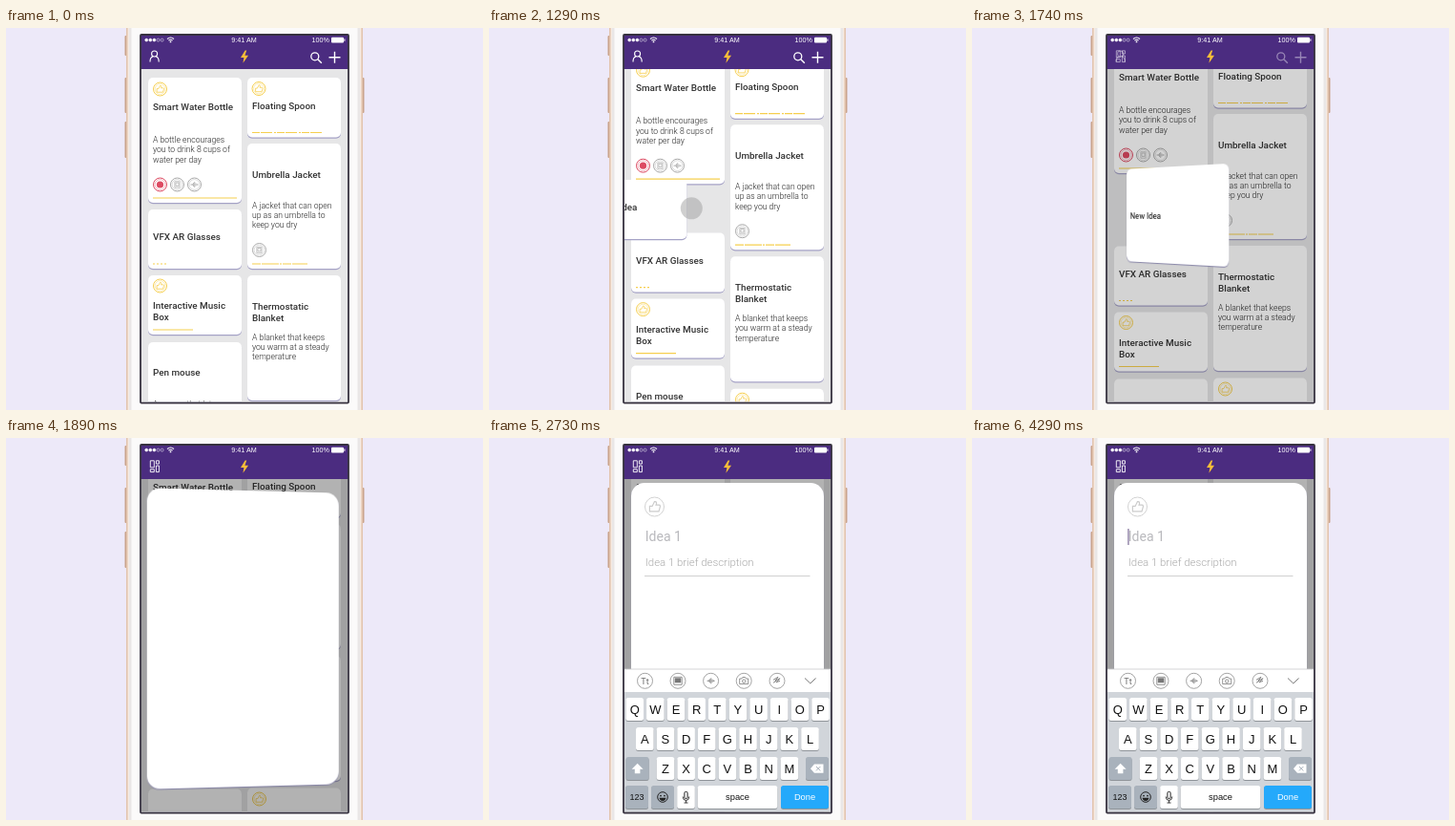
Recreate the animation shown at these times as an HTML page. Size 500 px wide and 400 px high, loop 4.5 s.

```html
<!DOCTYPE html>
<html lang="en">
<head>
<meta charset="utf-8">
<style>
  html, body { margin: 0; width: 100%; height: 100%; overflow: hidden; background: #ede9f9; }
  svg { position: absolute; left: 0; top: 0; width: 500px; height: 400px; }
  text { font-family: Roboto, sans-serif; }
  .key { font-family: "Liberation Sans", sans-serif; }
  #flip { position: absolute; background: #fff; box-shadow: 0 1px 1px #8885a8; }
  #label { position: absolute; inset: 0; display: flex; align-items: center; padding-left: 5px;
    transform: scaleX(-1); font: 500 9.9px Roboto, sans-serif; color: #333; white-space: nowrap; }
</style>
</head>
<body>
<svg id="back" viewBox="0 0 500 400"></svg>
<div id="flip"><div id="label">New Idea</div></div>
<svg id="front" viewBox="0 0 500 400"></svg>
<script>
const $ = id => document.getElementById(id);
const YELLOW = '#f6cf4f', GRAY = '#aaa';

// Drawing helpers returning SVG markup
const rect = (x, y, w, h, fill, r = 0, extra = '') =>
  `<rect x="${x}" y="${y}" width="${w}" height="${h}" rx="${r}" fill="${fill}" ${extra}/>`;
const circle = (x, y, r, fill, stroke = 'none', width = 1) =>
  `<circle cx="${x}" cy="${y}" r="${r}" fill="${fill}" stroke="${stroke}" stroke-width="${width}"/>`;
const line = (d, stroke, width = 1, extra = '') =>
  `<path d="${d}" fill="none" stroke="${stroke}" stroke-width="${width}" ${extra}/>`;
const text = (x, y, str, size, weight, fill, extra = '') =>
  `<text x="${x}" y="${y}" font-size="${size}" font-weight="${weight}" fill="${fill}" ${extra}>${str}</text>`;
const group = (id, body, extra = '') => `<g id="${id}" ${extra}>${body}</g>`;
const at = (x, y, body, scale = 1) => `<g transform="translate(${x} ${y}) scale(${scale})">${body}</g>`;
const middle = 'text-anchor="middle"';

const glyphs = {
  thumb: c => line('M-3.4-.4h1.8L0-3.6c1.5-.3 1.7 1 1 2.4h2.2c.9 0 .9 1 .5 2L3 3.2h-6.4z', c, .8),
  page: c => line('M-2.6-3.2h5.2v6.4h-5.2zM-1.5-2h3v3.4h-3z', c, .7),
  wave: c => line('M-4 0h1.5M-2.2-1v2M-1-2v4M.2-3v6M1.4-1.6v3.2M2.6-.8v1.6M2.6 0H4', c, .8),
  dot: c => circle(0, 0, 3.6, c)
};
const badge = (x, y, kind, color) => at(x, y,
  circle(0, 0, 7, 'none', color) + circle(0, 0, 5.4, 'none', color, .4) + glyphs[kind](color));

function card(x, y, h, { title = [], titleY, desc = [], descY, icons = [], bar, dash = '' }) {
  return rect(x, y + 1.2, 98, h, '#a5a2c6', 5) + rect(x, y, 98, h, '#fff', 5)
    + title.map((s, i) => text(x + 5, titleY + 12 * i, s, 9.9, 500, '#333')).join('')
    + desc.map((s, i) => text(x + 5, descY + 10.2 * i, s, 8.6, 300, '#222')).join('')
    + icons.map(a => badge(...a)).join('')
    + (bar ? line(`M${x + 5} ${y + h - 5}h${bar}`, YELLOW, 1.2, `stroke-dasharray="${dash}"`) : '');
}

const upperLeft = card(149, 52, 131, {
  title: ['Smart Water Bottle'], titleY: 86.3,
  desc: ['A bottle encourages', 'you to drink 8 cups of', 'water per day'], descY: 120.2,
  icons: [[161.5, 64, 'thumb', YELLOW], [161.5, 164, 'dot', '#dd4a62'],
    [179.5, 164, 'page', GRAY], [197.5, 164, 'wave', GRAY]], bar: 88
});
const lowerLeft = card(149, 190, 62, { title: ['VFX AR Glasses'], titleY: 222, bar: 15, dash: '2 2' })
  + card(149, 259, 62, {
    title: ['Interactive Music', 'Box'], titleY: 294,
    icons: [[161.5, 270, 'thumb', YELLOW]], bar: 42
  })
  + card(149, 329, 131, { title: ['Pen mouse'], titleY: 364, desc: ['A mouse that lets'], descY: 397 });
const right = card(253, 52, 62.5, {
    title: ['Floating Spoon'], titleY: 85,
    icons: [[265, 63.5, 'thumb', YELLOW]], bar: 74, dash: '8 1 12 2 2 1'
  })
  + card(253, 121, 131, {
    title: ['Umbrella Jacket'], titleY: 156.5,
    desc: ['A jacket that can open', 'up as an umbrella to', 'keep you dry'], descY: 189,
    icons: [[265.5, 232.5, 'page', GRAY]], bar: 58, dash: '9 1 18 1 2 1'
  })
  + card(253, 259, 131, {
    title: ['Thermostatic', 'Blanket'], titleY: 294.5,
    desc: ['A blanket that keeps', 'you warm at a steady', 'temperature'], descY: 327
  })
  + card(253, 397.5, 62, { icons: [[265.5, 409, 'thumb', YELLOW]] });

const sideButton = (x, y, h) => rect(x, y, 3, h, '#c9a48c', 1);
const phone = sideButton(124.5, 8, 21) + sideButton(124.5, 52, 37) + sideButton(124.5, 98, 38)
  + sideButton(372.5, 52, 37)
  + rect(126, -5, 248, 410, '#e3c4ae') + rect(127.6, -5, 244.8, 410, '#f6ebe3')
  + rect(129, -5, 242, 410, '#e9e6e6') + rect(131.5, -5, 237, 410, '#fbfafa');

$('back').innerHTML = `<clipPath id="screen"><rect x="142" y="8" width="216" height="383.5"/></clipPath>`
  + phone + `<g clip-path="url(#screen)">`
  + rect(142, 8, 216, 384, '#e6e6e7')
  + group('list', upperLeft + group('lower', lowerLeft) + right)
  + group('idea', card(149, 159, 62, { title: ['New Idea'], titleY: 191.3 }))
  + group('touch', circle(0, 188.8, 11.5, 'rgba(160,160,160,.5)'))
  + rect(142, 8, 216, 384, '#000', 0, 'id="dim"') + '</g>';

// Header
const statusBar = [0, 1, 2, 3, 4].map(i =>
    circle(147.2 + 4.1 * i, 12.6, 1.5, i < 3 ? '#fff' : 'none', '#fff', .5)).join('')
  + line('M169 11.5q3.5-3 7 0M170.4 13.1q2.1-1.8 4.2 0', '#fff', 1.1) + circle(172.5, 14.4, .9, '#fff')
  + text(249.5, 15.2, '9:41 AM', 7.2, 500, '#fff', middle + ' class="key"')
  + text(320.5, 15.2, '100%', 7.2, 500, '#fff', 'class="key"')
  + rect(341, 9.8, 13, 5.6, '#fff', 1) + rect(354.4, 11.4, 1, 2.4, '#fff');
const listNav = circle(155.6, 27, 3, 'none', '#fff', 1.1)
  + line('M151 35.5q0-5 3-5.6M160.2 35.5q0-5-3-5.6', '#fff', 1.1)
  + circle(323.8, 29.8, 4, 'none', '#fff', 1.3) + line('M326.8 32.8l4 4M338.5 30.8h12M344.5 24.8v12', '#fff', 1.4);
const gridNav = line('M151.3 23.8h4v7h-4zM157.4 23.8h3v3.2h-3zM157.4 29h3v6.6h-3zM151.3 32.8h4v2.8h-4z', '#fff', .9);
const header = rect(141, 7, 218, 36, '#4b2c80') + statusBar
  + group('listNav', listNav) + group('gridNav', gridNav)
  + '<path d="M250.6 23.5l-4.6 7.6h3.4l-1 5.7 5.6-8h-3.6l1.8-5.3z" fill="#f8bd38"/>';

const form = circle(173.5, 72, 10, 'none', '#d2d2d2') + at(173.5, 72, glyphs.thumb('#ccc'), 1.5)
  + text(163.8, 108.3, 'Idea 1', 14, 400, '#b9b9bd')
  + text(163.8, 134, 'Idea 1 brief description', 11.4, 300, '#aaa')
  + line('M163 144.5h173.5', '#d0d0d0')
  + rect(163, 95, 1.8, 17, '#a79cb8', 0, 'id="caret"');

// Keyboard
const key = (cx, y, w, label = '', fill = '#fff', size = 13, color = '#111') =>
  rect(cx - w / 2, y + 1, w, 24, '#8f9499', 2.5) + rect(cx - w / 2, y, w, 24, fill, 2.5)
  + text(cx, y + 12 + size * .36, label, size, 400, color, middle + ' class="key"');
const keyRow = (letters, x, y) => [...letters].map((c, i) => key(x + 21.65 * i, y, 18.6, c)).join('');
const DARK = '#a9b2bc';
const tool = (x, body) => circle(x, 254.3, 8, 'none', '#999', .9) + at(x, 254.3, body);
const toolbar = rect(142, 242, 216, 24, '#fff') + line('M142 242h216', '#c9c9cc', .8)
  + tool(163.5, text(0, 3.2, 'Tt', 9, 400, '#666', middle))
  + tool(198, rect(-3.2, -3, 6.4, 5, '#777') + line('M-4.2-4h8.4v8h-8.4z', '#777', .8))
  + tool(232.6, glyphs.wave('#777'))
  + tool(267.2, line('M-4.5-2.3h2.2l1-1.5h2.6l1 1.5h2.2v5.6h-9z', '#777', .8) + circle(0, .3, 1.7, 'none', '#777', .8))
  + tool(302, line('M-4-1l5-3-3 4 5-2.5-4 4 4-1.5M-4 2l3-2', '#777', .9))
  + line('M331 251.5l5.8 5.5 5.8-5.5', '#777', 1);
const keyboard = toolbar + rect(142, 266, 216, 126, '#d1d5da')
  + keyRow('QWERTYUIOP', 152.7, 272) + keyRow('ASDFGHJKL', 163.3, 303) + keyRow('ZXCVBNM', 185, 334)
  + key(155.6, 334, 24, '', DARK) + key(344, 334, 24, '', DARK)
  + '<path d="M155.6 340.8l6 6h-3.2v4.4h-5.6v-4.4h-3.2z" fill="#fff"/>'
  + '<path d="M337 346.2l4-4.6h9.5v9.2H341z" fill="#fff"/>' + line('M343 344l4.4 4.4M347.4 344l-4.4 4.4', DARK, 1)
  + key(155, 364, 24, '123', DARK, 9) + key(182, 364, 24, '', DARK) + key(206.5, 364, 18.6)
  + circle(182, 376, 5.3, 'none', '#222') + circle(180, 374.6, .9, '#222') + circle(184, 374.6, .9, '#222')
  + '<path d="M178.5 376.8h7q-.6 3.2-3.5 3.2t-3.5-3.2z" fill="#222"/>'
  + rect(204.9, 370.3, 3.2, 7.4, 'none', 1.6, 'stroke="#222" stroke-width="1"')
  + line('M203.2 375.5q0 4 3.3 4t3.3-4M206.5 379.5v2.3M204.5 382h4', '#222', .9)
  + key(260.5, 364, 83.5, 'space', '#fff', 9.3) + key(331, 364, 50, 'Done', '#24a9fb', 9.3, '#fff');

$('front').innerHTML = '<g clip-path="url(#screen)">' + group('form', form) + group('keyboard', keyboard) + '</g>'
  + header + rect(141, 7, 218, 385.6, 'none', 1, 'stroke="#36313f" stroke-width="1.8"');

// Motion
const span = (t, from, to) => Math.min(1, Math.max(0, (t - from) / (to - from)));
const easeInOut = p => p < .5 ? 4 * p ** 3 : 1 - 4 * (1 - p) ** 3;
const easeOut = p => 1 - (1 - p) ** 3;
const mix = (a, b, p) => a + (b - a) * p;
const move = (id, x, y) => $(id).setAttribute('transform', `translate(${x} ${y})`);
const fade = (id, value) => $(id).style.opacity = value;
const FLIP_START = 1620;

function flipCard(t) {
  const p = easeInOut(span(t, FLIP_START, 1980)), quick = 1 - (1 - p) ** 2;
  const w = mix(98, 202, quick), h = mix(62, 326, p), cy = mix(190, 210, quick);
  const angle = 180 * (1 - p) ** 1.22;
  Object.assign($('flip').style, {
    display: t < FLIP_START ? 'none' : 'block',
    left: '149px', top: cy - h / 2 + 'px', width: w + 'px', height: h + 'px',
    borderRadius: mix(5, 14, p) + 'px',
    transform: `perspective(600px) rotateY(${angle}deg)`
  });
  fade('label', angle > 90 ? 1 : 0);
}

function render(now) {
  const t = now % 4500;
  const slide = easeInOut(span(t, 1050, 1487));
  move('list', 0, -31 * slide);
  move('lower', 0, 69.5 * slide);
  move('idea', -110 * (1 - slide), 0);
  fade('idea', t < FLIP_START ? 1 : 0);
  move('touch', 142 + 110 * slide, 0);
  fade('touch', span(t, 930, 1030) * (1 - span(t, 1540, 1650)));

  const swap = span(t, FLIP_START, 1830);
  fade('dim', .3 * swap);
  fade('listNav', 1 - swap);
  fade('gridNav', swap);
  flipCard(t);
  fade('form', span(t, 1980, 2190));
  move('keyboard', 0, 150 * (1 - easeOut(span(t, 2200, 2700))));
  const caretOn = (t >= 2880 && t < 3240) || (t >= 3600 && t < 3930) || t >= 4290;
  fade('caret', caretOn ? 1 : 0);
}

function tick() {
  render(performance.now());
  requestAnimationFrame(tick);
}
tick();
</script>
</body>
</html>
```
